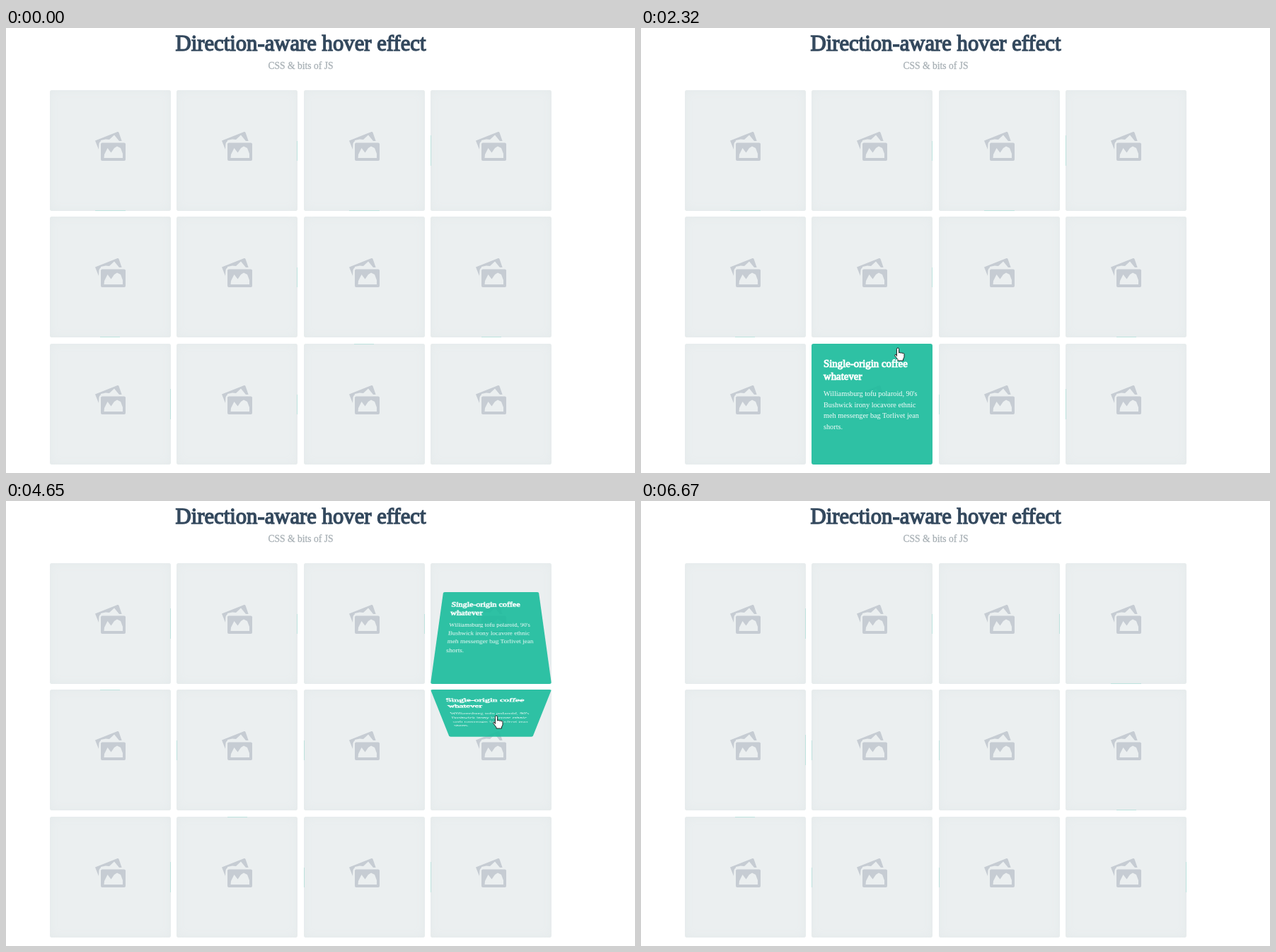
An HTML page for the animation above (7.07 s loop, 889 by 630 pixels).

```html
<!DOCTYPE html>
<html lang="en">
<head>
<meta charset="utf-8">
<title>Direction-aware hover effect</title>
<style>
  html, body { margin: 0; width: 100%; height: 100%; overflow: hidden; background: #fff; }
  body { position: relative; font-family: "Liberation Serif", "Times New Roman", serif; }
  h1, h2, h3, p { margin: 0; position: absolute; white-space: nowrap; font-weight: 400; }
  h1, h2 { left: 0; width: 833px; text-align: center; }
  h1 { top: 3.6px; font-size: 30.7px; line-height: 36px; color: #34495e; -webkit-text-stroke: 1.4px #34495e; }
  h2 { top: 45.4px; font-size: 13.6px; line-height: 18px; color: #a9b1b6; -webkit-text-stroke: .3px #a9b1b6; }
  .tile {
    position: absolute; width: 171px; height: 171px; border-radius: 3px;
    background: #ebeff0; box-shadow: inset 0 0 14px #e4eaeb; perspective: 356px;
  }
  .tile svg { position: absolute; left: 0; top: 0; }
  .card {
    position: absolute; inset: 0; border-radius: 3px; color: #fff;
    background: rgba(26, 188, 156, .9); visibility: hidden; backface-visibility: hidden;
  }
  h3 { left: 17px; top: 18.5px; font-size: 14.83px; line-height: 18px; -webkit-text-stroke: .9px #fff; }
  p { left: 17px; top: 63.4px; font-size: 10.24px; line-height: 15.4px; color: rgba(255, 255, 255, .95); }
  .edge { position: absolute; background: rgba(26, 188, 156, .2); }
  #cursor { position: absolute; left: 0; top: 0; overflow: visible; }
  #cursor path { fill: #fff; stroke: #222; stroke-width: 1; stroke-linejoin: round; }
</style>
</head>
<body>
<h1>Direction-aware hover effect</h1>
<h2>CSS &amp; bits of JS</h2>
<div id="grid"></div>
<svg id="cursor" width="20" height="24">
  <path id="hand" d="M-1.6 11.5V1.5a1.6 1.6 0 0 1 3.2 0V7.2a1.4 1.4 0 0 1 2.7.3a1.3 1.3 0 0 1 2.5.5a1.2 1.2 0 0 1 2.2.8V13l-1.5 3v2H0v-1.5l-4-5.3c-1-1.5.7-2.8 2-1.4z"/>
  <path id="arrow" d="M0 0V12.5L2.9 9.8L4.9 14.6L7 13.7L5 9H9z"/>
</svg>
<template id="inside">
  <svg width="171" height="171">
    <path fill="#c6ccd3" d="M64 71.5L95.5 59Q97 58.5 97.5 60L102 73L70 75L69 84z"/>
    <path fill="#ebeff0" d="M71 79L72 71L79 69.500L84 70L91 63.500L98 72V77H71z"/>
    <rect x="72" y="74.500" width="35" height="25.500" rx="2" fill="#c6ccd3" stroke="#ebeff0" stroke-width="5" paint-order="stroke"/>
    <path fill="#ebeff0" d="M76.500 96L77 91L81.500 82L86.500 88.500L91 82L95 79.500L100 82L103 90V96z"/>
  </svg>
  <div class="edge"></div>
  <div class="card">
    <h3>Single-origin coffee<br>whatever</h3>
    <p>Williamsburg tofu polaroid, 90's<br>Bushwick irony locavore ethnic<br>meh messenger bag Torlivet jean<br>shorts.</p>
  </div>
</template>
<script>
const LOOP = 7070, TURN = 300, FOLDED = 104;
const COLS = 4, ROWS = 3, SIZE = 171, PITCH = 179.5, LEFT = 61.5, TOP = 88;

// Pointer route: time, x, y and, where it crosses into the next tile, the direction.
const route = [
  [380, 889, 604], [800, 846, 577], [1030, 771, 540, 'L'], [1380, 596, 522, 'L'],
  [1707, 416, 514, 'L'], [1770, 313, 511], [1850, 237, 514, 'L'], [1940, 195, 516],
  [2030, 237, 515, 'R'], [2200, 330, 490], [2352, 372, 443, 'T'], [2735, 385, 263, 'T'],
  [2870, 394, 196], [2900, 416, 190, 'R'], [3000, 480, 200], [3100, 490, 263, 'B'],
  [3340, 416, 350, 'L'], [3623, 237, 330, 'L'], [3750, 137, 263], [3765, 136, 259, 'T'],
  [3900, 150, 200], [4045, 237, 180, 'R'], [4180, 416, 175, 'R'], [4330, 596, 180, 'R'],
  [4450, 680, 210], [4587, 690, 263, 'B'], [4650, 693, 303], [4850, 700, 443, 'B'],
  [5020, 596, 520, 'L'], [5140, 416, 525, 'L'], [5270, 237, 520, 'L'], [5340, 170, 500],
  [5440, 160, 443, 'T'], [5600, 190, 320], [5690, 244, 252], [5700, 252, 249, 'RT'],
  [5850, 416, 220, 'R'], [5990, 596, 200, 'R'], [6130, 690, 205], [6255, 720, 263, 'B'],
  [6310, 740, 443, 'B'], [6360, 771, 510, 'R'], [6430, 800, 530], [6600, 848, 568]
];
const POINTER_END = 6640;

const sides = {
  L: { step: [-1, 0], back: 'R', origin: '0 50%', axis: 'Y', sign: 1 },
  R: { step: [1, 0], back: 'L', origin: '100% 50%', axis: 'Y', sign: -1 },
  T: { step: [0, -1], back: 'B', origin: '50% 0', axis: 'X', sign: -1 },
  B: { step: [0, 1], back: 'T', origin: '50% 100%', axis: 'X', sign: 1 }
};

// Hinge side of each folded card at the start, row by row.
const firstSides = 'BRBL' + 'BR-B' + 'RRT-';

const grid = document.getElementById('grid');
const inside = document.getElementById('inside');
const tiles = [...firstSides].map((side, i) => {
  const el = document.createElement('div');
  const col = i % COLS, row = Math.floor(i / COLS);
  el.className = 'tile';
  el.style.left = LEFT + PITCH * col + 'px';
  el.style.top = Math.floor(TOP + PITCH * row) + 'px';
  el.append(inside.content.cloneNode(true));
  grid.append(el);
  return {
    col, row, side, turns: [],
    card: el.querySelector('.card'), edge: el.querySelector('.edge')
  };
});

function tileAt(col, row) {
  return col < COLS && row < ROWS ? tiles[row * COLS + col] : null;
}

// Each crossing closes the card left behind and opens the next one.
let col = COLS, row = ROWS - 1;
for (const [time, , , dir] of route) {
  if (!dir) continue;
  const out = dir[0];
  tileAt(col, row)?.turns.push({ time, side: out, opens: false });
  for (const d of dir) {
    col += sides[d].step[0];
    row += sides[d].step[1];
  }
  tileAt(col, row)?.turns.push({ time, side: sides[out].back, opens: true });
}

// The CSS "ease" curve, cubic-bezier(.25, .1, .25, 1).
function ease(x) {
  if (x >= 1) return 1;
  const curve = (a, b, s) => 3 * a * s * (1 - s) ** 2 + 3 * b * s * s * (1 - s) + s ** 3;
  let lo = 0, hi = 1;
  for (let i = 0; i < 20; i++) {
    const mid = (lo + hi) / 2;
    if (curve(.25, .25, mid) < x) lo = mid; else hi = mid;
  }
  return curve(.1, 1, lo);
}

function drawEdge(tile, side) {
  const { edge, col, row } = tile;
  edge.hidden = !sides[side];
  if (edge.hidden) return;
  const upright = sides[side].axis === 'Y';
  const long = upright ? col % 3 === 0 : row === 0;
  const length = long ? 43 : 28;
  const along = (SIZE - length) / 2;
  const across = side === 'R' || side === 'B' ? SIZE - 1 : 0;
  Object.assign(edge.style, {
    left: (upright ? across : along) + 'px',
    top: (upright ? along : across) + 'px',
    width: (upright ? 1 : length) + 'px',
    height: (upright ? length : 1) + 'px'
  });
}

function drawTile(tile, t) {
  const turn = tile.turns.filter(e => e.time <= t).pop();
  const done = turn ? ease((t - turn.time) / TURN) : 1;
  const folded = !turn || (!turn.opens && done === 1);
  tile.card.style.visibility = folded ? 'hidden' : 'visible';
  drawEdge(tile, folded ? (turn ? turn.side : tile.side) : '-');
  if (folded) return;
  const { origin, axis, sign } = sides[turn.side];
  const angle = FOLDED * (turn.opens ? 1 - done : done);
  tile.card.style.transformOrigin = origin;
  tile.card.style.transform = `rotate${axis}(${sign * angle}deg)`;
}

const cursor = document.getElementById('cursor');
const hand = document.getElementById('hand');
const arrow = document.getElementById('arrow');

function drawCursor(t) {
  const shown = t >= route[0][0] && t < POINTER_END;
  cursor.style.display = shown ? '' : 'none';
  if (!shown) return;
  const next = route.findIndex(p => p[0] > t);
  const b = next < 0 ? route[route.length - 1] : route[next];
  const a = next < 0 ? b : route[next - 1];
  const k = a === b ? 0 : (t - a[0]) / (b[0] - a[0]);
  const x = a[1] + (b[1] - a[1]) * k;
  const y = a[2] + (b[2] - a[2]) * k;
  const outside = x > 815;
  hand.style.display = outside ? 'none' : '';
  arrow.style.display = outside ? '' : 'none';
  cursor.style.transform = `translate(${Math.round(x)}px, ${Math.round(y)}px)`;
}

const start = performance.now();
function frame() {
  const t = (performance.now() - start) % LOOP;
  tiles.forEach(tile => drawTile(tile, t));
  drawCursor(t);
  requestAnimationFrame(frame);
}
frame();
</script>
</body>
</html>
```
